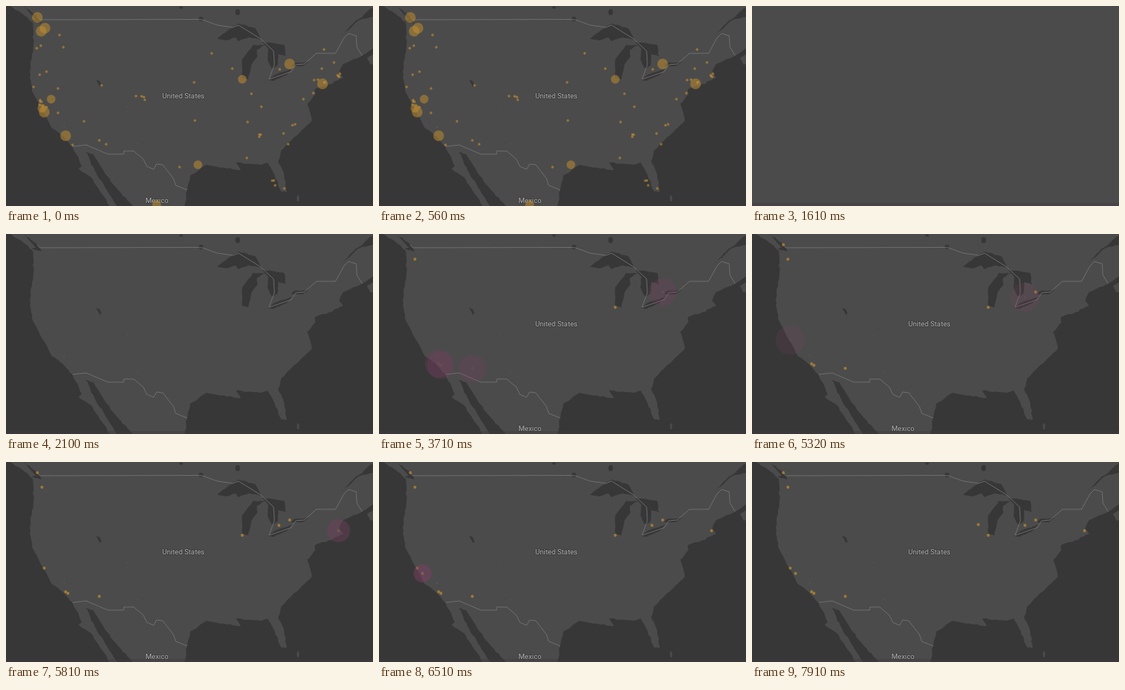
These frames come from a looping animation (480x262 px, 8 s). An HTML page with a canvas:

```html
<!DOCTYPE html>
<html lang="en">
<head>
<meta charset="utf-8">
<title>Activity map</title>
<style>
  html, body { margin: 0; width: 100%; height: 100%; overflow: hidden; background: #4b4b4b; }
  canvas { display: block; width: 480px; height: 262px; }
</style>
</head>
<body>
<canvas id="stage" width="480" height="262"></canvas>
<script>
const W = 480, H = 262, LOOP = 8000, SHRINK = 450;
const LAND = '#4b4b4b', WATER = '#373737', LINE = '#777';
const AMBER = [190, 140, 50], PLUM = [124, 62, 98];
const ctx = document.getElementById('stage').getContext('2d');

const clamp = v => Math.max(0, Math.min(1, v));
const mix = (a, b, p) => a.map((v, i) => Math.round(v + (b[i] - v) * p));
const rgba = (c, a) => `rgba(${c.join()},${a})`;

let seed = 7;
function random() {
  seed = (seed * 16807) % 2147483647;
  return seed / 2147483647;
}
const jitter = size => (random() - 0.5) * size;

// Straight runs between points, broken up by a small random roughness
function trace(c, points, rough = 0) {
  c.beginPath();
  c.moveTo(points[0], points[1]);
  for (let i = 2; i < points.length; i += 2) {
    const [x0, y0, x1, y1] = points.slice(i - 2, i + 2);
    const parts = rough ? Math.ceil(Math.hypot(x1 - x0, y1 - y0) / 5) : 1;
    for (let k = 1; k < parts; k++) {
      const p = k / parts;
      c.lineTo(x0 + (x1 - x0) * p + jitter(rough), y0 + (y1 - y0) * p + jitter(rough));
    }
    c.lineTo(x1, y1);
  }
}
function area(c, points, color, rough) {
  trace(c, points, rough);
  c.closePath();
  c.fillStyle = color;
  c.fill();
}
function line(c, points) {
  trace(c, points);
  c.strokeStyle = LINE;
  c.lineWidth = 0.8;
  c.stroke();
}
function disc(c, x, y, r, color, ry = r) {
  c.beginPath();
  c.ellipse(x, y, r, ry, 0, 0, Math.PI * 2);
  c.fillStyle = color;
  c.fill();
}

function drawSeas(c) {
  const sea = points => area(c, points, WATER, 1.8);
  sea([-5,-5, 5,0, 20,9, 35,22, 36,50, 31,86, 34,111, 48,138, 60,160, 75,171, 87,184, 99,210,
    95,213, 111,224, 123,243, 138,265, -5,265]);
  sea([145,262, 134,245, 118,219, 104,191, 114,194, 137,230, 166,262]);
  const gulf = [233,266, 237,241, 241,222, 262,208, 307,215, 301,205, 333,208, 342,205,
    349,217, 360,243, 367,244, 364,222, 356,203, 360,189];
  const east = [394,156, 400,150, 394,128, 405,115, 404,109, 427,101, 441,94, 436,88,
    441,76, 471,62, 485,52, 485,266];
  sea([...gulf, ...east]);
  sea([437,40, 454,23, 480,2, 480,14, 463,18, 445,33]);
  sea([23,0, 41,14, 46,23, 33,19, 39,18]);
}

function drawLakes(c) {
  const lake = points => area(c, points, WATER, 1.2);
  lake([276,43, 291,31, 304,23, 326,29, 334,44, 318,41, 304,46, 300,41, 288,45]);
  lake([309,94, 309,70, 323,51, 339,51, 328,58, 329,66, 321,77, 317,96]);
  lake([335,47, 364,51, 366,66, 356,63, 355,78, 348,82, 342,70, 343,56]);
  lake([343,97, 350,91, 375,82, 366,91, 350,98]);
  lake([373,79, 376,75, 396,73, 388,79]);
  lake([118,97, 122,98, 125,104, 123,106]);
  disc(c, 303, 8, 3, WATER, 4);
  disc(c, 255, 17, 3, WATER);
  disc(c, 229, 2, 2.5, WATER, 1.5);
}

function drawBorders(c) {
  line(c, [41,14, 44,18, 251,17.5, 257,18, 276,25, 297,28, 304,25, 333,43, 350,59, 351,77,
    344,96, 373,86, 379,77, 390,76, 406,62, 431,62, 442,42, 448,36, 458,39, 459,54, 466,65]);
  line(c, [87,184, 105,182, 133,194, 154,194, 154,190, 167,190, 180,201, 184,210, 193,214,
    197,207, 205,208, 219,226, 222,235, 237,241]);
}

function buildMap() {
  const canvas = document.createElement('canvas');
  canvas.width = W;
  canvas.height = H;
  const c = canvas.getContext('2d');
  c.lineJoin = 'round';
  c.fillStyle = LAND;
  c.fillRect(0, 0, W, H);
  drawSeas(c);
  drawLakes(c);
  area(c, [482,62, 472,68, 477,77, 482,75], LAND);
  disc(c, 382, 252, 1.5, LAND, 4);
  disc(c, 421, 101, 7, LAND, 1.5);
  [[159, 132], [76, 159], [172, 180]].forEach(([x, y]) => disc(c, x, y, 1.2, '#575757', 0.8));
  drawBorders(c);
  return canvas;
}
const map = buildMap();

const largeDots = [41,15, 51,29, 46,33, 50,139, 78,170, 371,76, 414,102];
const mediumDots = [59,122, 47,134, 251,208, 197,260, 309,96];
const smallDots = [70,38, 75,54, 44,90, 53,86, 36,106, 68,108, 125,104, 68,140, 102,151,
  122,176, 131,181, 87,182, 170,118, 246,100, 247,150, 269,62, 296,82, 321,115, 334,132,
  316,152, 315,199, 227,211, 352,235, 364,239, 363,167, 369,181, 389,122, 402,114, 403,97,
  413,82, 429,74, 416,57, 358,83];
// Groups of small dots: x, y, spread, count
const groups = [[50,129,14,6], [180,120,8,3], [331,169,6,3], [349,226,6,2], [376,154,5,2],
  [434,91,7,4], [414,99,12,3], [43,55,6,2]];
for (const [x, y, spread, count] of groups) {
  for (let i = 0; i < count; i++) smallDots.push(x + jitter(spread), y + jitter(spread));
}

// Arrivals: x, y, start time
const arrivals = [[47,33,2450], [309,96,3150], [78,170,3640], [81,172,3640], [122,176,3640],
  [371,76,3640], [41,14,4410], [50,139,5280], [357,83,5280], [435,90,5670],
  [57,146,6290], [296,82,6930]];

function drawLabel(text, x, y) {
  ctx.strokeText(text, x, y);
  ctx.fillText(text, x, y);
}
function drawLabels(alpha) {
  ctx.globalAlpha = alpha;
  ctx.font = '9.3px Roboto, "Open Sans", sans-serif';
  ctx.textAlign = 'center';
  ctx.lineJoin = 'round';
  ctx.lineWidth = 1.6;
  ctx.strokeStyle = '#3a3a3a';
  ctx.fillStyle = '#adadad';
  drawLabel('United States', 232, 120.5);
  drawLabel('Mexico', 197.5, 258);
  ctx.globalAlpha = 1;
}
function drawDots(points, r, alpha) {
  for (let i = 0; i < points.length; i += 2) {
    disc(ctx, points[i], points[i + 1], r, rgba(AMBER, alpha));
  }
}
function drawArrival([x, y, start], t) {
  if (t < start) return;
  const p = clamp((t - start) / SHRINK);
  if (p < 1) {
    const tint = mix(PLUM, AMBER, clamp(p * 2 - 1));
    disc(ctx, x, y, 21 - 19 * p, rgba(tint, 0.1 + 0.85 * p));
  }
  disc(ctx, x, y, 1.9, rgba(AMBER, 0.75 * p));
}
function drawRepeat(t) {
  const p = (t - 7560) / 350;
  if (p >= 0 && p < 1) disc(ctx, 41, 14, 4.5 - 2.5 * p, rgba(AMBER, 0.15 + 0.3 * p));
}

function draw(t) {
  const full = t < 1610;
  if (!full && t < 2100) {
    ctx.fillStyle = LAND;
    ctx.fillRect(0, 0, W, H);
  } else {
    ctx.drawImage(map, 0, 0);
    drawLabels(full ? 1 : clamp((t - 2170) / 300));
    if (full) {
      drawDots(largeDots, 7, 0.55);
      drawDots(mediumDots, 5.7, 0.55);
      drawDots(smallDots, 1.7, 0.65);
    } else {
      arrivals.forEach(a => drawArrival(a, t));
      drawRepeat(t);
    }
  }
  if (!full) {
    ctx.fillStyle = 'rgba(64,58,64,0.4)';
    ctx.fillRect(0, 258, W, 4);
  }
}

function tick() {
  draw(performance.now() % LOOP);
  requestAnimationFrame(tick);
}
tick();
</script>
</body>
</html>
```
